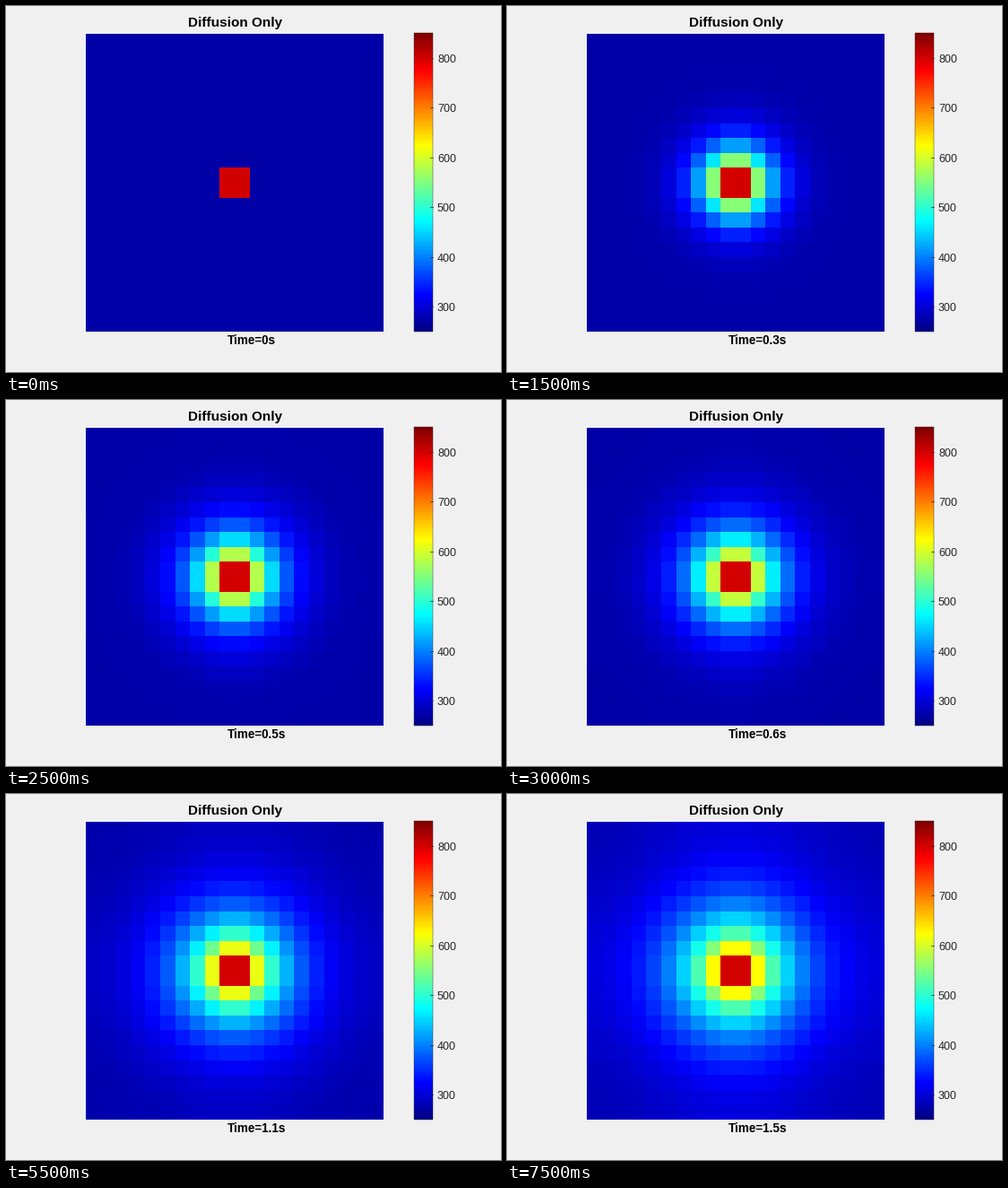
A matplotlib script for the animation above (8000 ms loop, 552 by 408 pixels).

```python
import numpy as np
import matplotlib.pyplot as plt
from matplotlib.animation import FuncAnimation
from matplotlib.colors import ListedColormap
from matplotlib.patches import Rectangle

W, H, DPI = 552, 408, 100
FRAMES, INTERVAL = 16, 500
N = 20
COLD, HOT = 273.0, 800.0
VMIN, VMAX = 250, 850
RATE = 10.0          # diffusivity in cells^2 per second
STEP, SUBSTEPS = 0.1, 10
INK = (0.15, 0.15, 0.15)

plt.rcParams["font.family"] = "Liberation Sans"


def jet(levels=256):
    x = np.arange(1, levels + 1) / levels
    ramps = [1.5 - np.abs(4 * x - c) for c in (3, 2, 1)]
    return ListedColormap(np.clip(np.stack(ramps, axis=1), 0, 1))


def simulate():
    core = slice(N // 2 - 1, N // 2 + 1)
    temp = np.full((N, N), COLD)
    temp[core, core] = HOT
    fields = [temp.copy()]
    k = RATE * STEP / SUBSTEPS
    for _ in range(FRAMES - 1):
        for _ in range(SUBSTEPS):
            p = np.pad(temp, 1, mode="edge")
            near = p[:-2, 1:-1] + p[2:, 1:-1] + p[1:-1, :-2] + p[1:-1, 2:]
            temp = temp + k * (near - 4 * temp)
            temp[core, core] = HOT
        fields.append(temp.copy())
    return fields


fig = plt.figure(figsize=(W / DPI, H / DPI), dpi=DPI, facecolor="#f0f0f0")
ax = fig.add_axes([0, 0, 1, 1])
ax.axis("off")


def label(x, y, text, px, **kw):
    return ax.text(x, y, text, fontsize=px * 72 / DPI, va="baseline", **kw)


def image(data, extent):
    return ax.imshow(data, extent=extent, cmap=cmap, vmin=VMIN, vmax=VMAX,
                     interpolation="nearest", aspect="auto")


cmap = jet()
fields = simulate()
plate = image(fields[0], (89, 421, 363, 31))

top, bottom, left, right = 30, 363, 455, 476
image(np.linspace(VMAX, VMIN, 256)[:, None], (left, right, bottom, top))
ax.add_patch(Rectangle((left, top), right - left, bottom - top, fill=False,
                       ec=INK, lw=0.3))
for value in range(300, 801, 100):
    y = bottom - (value - VMIN) / (VMAX - VMIN) * (bottom - top)
    ax.plot([right - 3, right], [y, y], color=INK, lw=0.5)
    label(481, y + 5, str(value), 12.5, color=INK)

label(255.5, 23, "Diffusion Only", 15.3, ha="center", weight="bold")
clock = label(247, 377, "", 13.5, weight="bold")

ax.set_xlim(0, W)
ax.set_ylim(H, 0)


def update(i):
    plate.set_data(fields[i])
    clock.set_text(f"Time={i * STEP:g}s")
    return plate, clock


anim = FuncAnimation(fig, update, frames=FRAMES, interval=INTERVAL,
                     repeat=True, repeat_delay=0)
plt.show()
```
